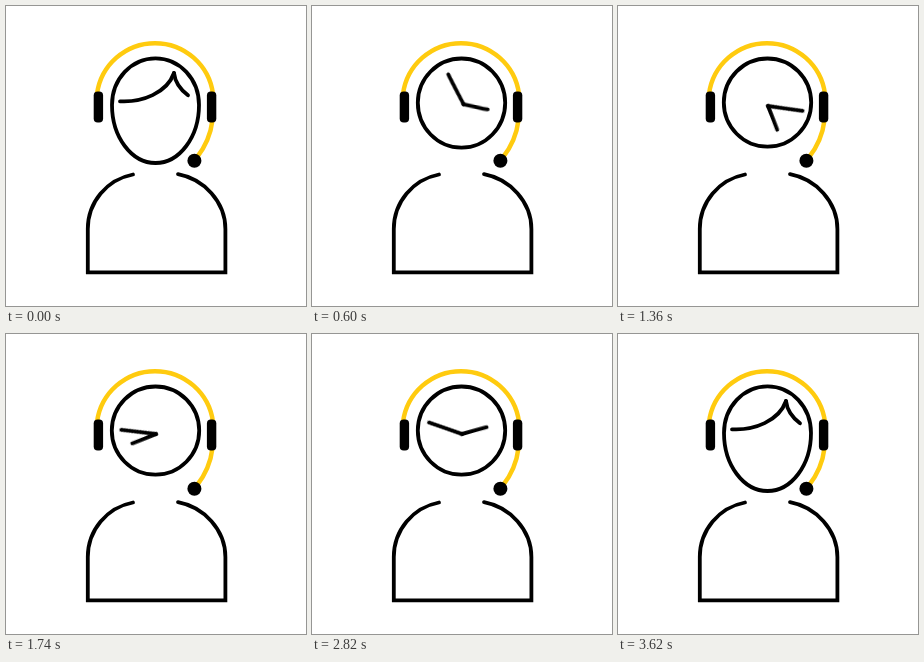
These frames come from a looping animation (300x300 px, 4.8 s). An HTML page:

```html
<!DOCTYPE html>
<html lang="en">
<head>
<meta charset="utf-8">
<title>Support around the clock</title>
<style>
  html, body { margin: 0; width: 100%; height: 100%; overflow: hidden; background: #fff; }
  svg { display: block; width: 100%; height: 100%; }

  .line { fill: none; stroke: #000; stroke-width: 3.8; stroke-linecap: round; }
  .band { fill: none; stroke: #ffcb0f; stroke-width: 4.5; }

  .face, .long, .short, .turn1, .turn2 {
    animation: 4800ms cubic-bezier(.7, 0, .3, 1) infinite;
  }
  .turn1, .turn2 { transform-origin: 150px 100px; }
  .turn1 { animation-name: turn1; }
  .turn2 { animation-name: turn2; }
  .face { animation-name: face; }
  .long { animation-name: long; }
  .short { animation-name: short; }

  /* the hour hand turns once while the minute hand turns twice */
  @keyframes turn1 {
    0% { transform: rotate(0deg); }
    75.4167%, 100% { transform: rotate(360deg); }
  }
  @keyframes turn2 {
    0% { transform: rotate(0deg); }
    75.4167%, 100% { transform: rotate(720deg); }
  }

  /* head <-> dial */
  @keyframes face {
    0%, 75.4167%, 100% {
      d: path("M149.5 52.3 C173.5 52.3 193 73 193 99 C193 131 173.5 157 149.5 157 C125.5 157 106 131 106 99 C106 73 125.5 52.3 149.5 52.3 Z");
    }
    16.6667%, 58.75% {
      d: path("M149.5 52.5 C173.6 52.5 193.2 72.3 193.2 96.6 C193.2 120.9 173.6 140.7 149.5 140.7 C125.4 140.7 105.8 120.9 105.8 96.6 C105.8 72.3 125.4 52.5 149.5 52.5 Z");
    }
  }

  /* fringe <-> hands */
  @keyframes long {
    0%, 75.4167%, 100% { d: path("M114 95.3 C136 96.5 161 87 168 67"); }
    16.6667%, 58.75% { d: path("M128.5 72.4 C135.7 81.6 142.8 90.8 150 100"); }
  }
  @keyframes short {
    0%, 75.4167%, 100% { d: path("M168 67 C169 76 175 84 182 89.3"); }
    16.6667%, 58.75% { d: path("M150 100 C158.5 100.1 167 100.3 175.5 100.4"); }
  }
</style>
</head>
<body>
<svg viewBox="0 0 300 300">
  <path class="line" d="M127 168.5 C101 173.5 81.8 196 81.8 223 V266.3 H219.4 V223 C219.4 196 198 173 172 168.2"/>

  <path class="face line" d="M149.5 52.3 C173.5 52.3 193 73 193 99 C193 131 173.5 157 149.5 157 C125.5 157 106 131 106 99 C106 73 125.5 52.3 149.5 52.3 Z"/>
  <g class="turn2"><path class="long line" d="M114 95.3 C136 96.5 161 87 168 67"/></g>
  <g class="turn1"><path class="short line" d="M168 67 C169 76 175 84 182 89.3"/></g>

  <path class="band" d="M91 88 A58.5 58.5 0 0 1 207 88"/>
  <path class="band" d="M206.5 114 Q204 135 190.5 152"/>
  <rect x="87.7" y="85.4" width="9.4" height="31" rx="4"/>
  <rect x="200.9" y="85.4" width="9.4" height="31" rx="4"/>
  <circle cx="188.4" cy="154.7" r="7"/>
</svg>
</body>
</html>
```
